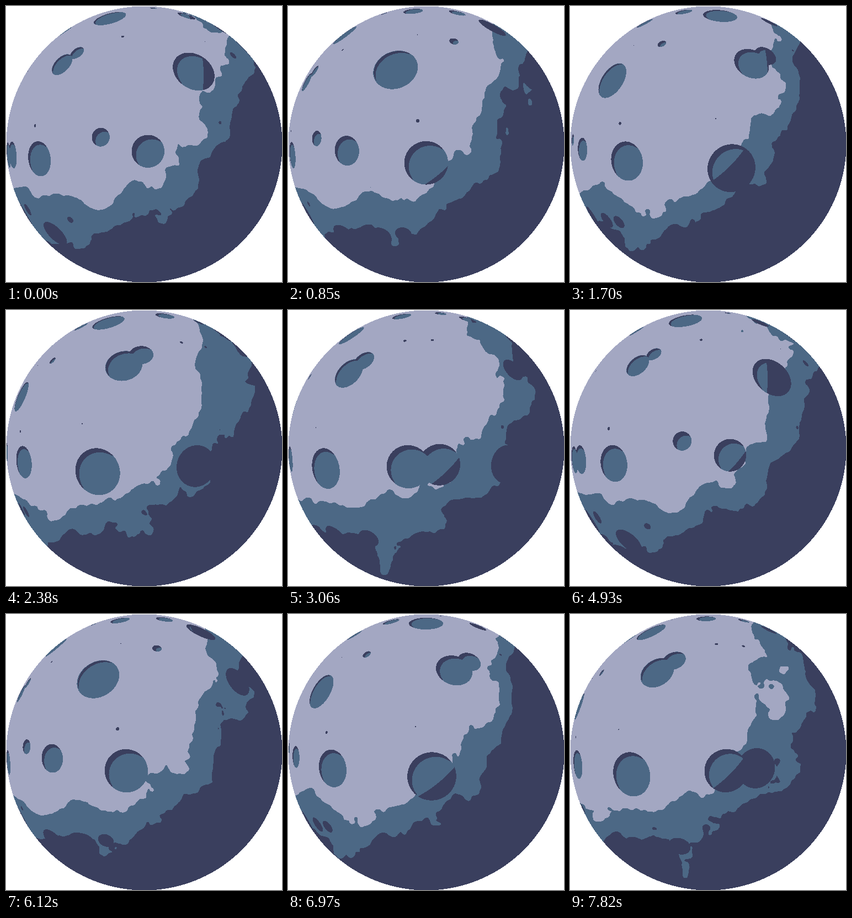
An HTML page with a canvas for the animation above (7990 ms loop, 500 by 500 pixels).

```html
<!DOCTYPE html>
<html lang="en">
<head>
<meta charset="utf-8">
<title>Rotating moon</title>
<style>
  html, body { margin: 0; height: 100%; overflow: hidden; background: #fff; }
  canvas { display: block; width: 100vw; height: 100vh; }
</style>
</head>
<body>
<canvas id="moon" width="500" height="500"></canvas>
<script>
const SIZE = 500;
const STEP_MS = 170;
const LOOP_MS = 7990;
const TURN_STEPS = 30;          // steps until the surface repeats

const GROUND_CELLS = 8;
const CRATER_CELLS = 5;
const LIGHT = 0.25;             // light position, same in x and y
const LIT_LIMIT = 0.617;
const SHADE_LIMIT = 0.731;
const CRATER_LIMIT = 0.465;
const RIM_SHIFT = (LIGHT - 0.5) * 0.03;

// Colours as ABGR
const LIT = 0xffc2a7a3;
const SHADE = 0xff85684c;
const DARK = 0xff5e3f3a;

const fract = v => v - Math.floor(v);
const smooth = t => t * t * (3 - 2 * t);

function randomGrid(cells) {
  const grid = new Float64Array(cells * cells);
  for (let y = 0; y < cells; y++) {
    for (let x = 0; x < cells; x++) {
      grid[y * cells + x] = fract(Math.sin(x * 12.9898 + y * 78.233) * 15.5453 * 0.55);
    }
  }
  return grid;
}

const groundGrid = randomGrid(GROUND_CELLS);
const craterGrid = randomGrid(CRATER_CELLS);

function noise(x, y) {
  const col = Math.floor(x), row = Math.floor(y);
  const fx = smooth(x - col), fy = smooth(y - row);
  const left = col % GROUND_CELLS, right = (col + 1) % GROUND_CELLS;
  const top = row % GROUND_CELLS * GROUND_CELLS;
  const bottom = (row + 1) % GROUND_CELLS * GROUND_CELLS;
  const a = groundGrid[top + left], b = groundGrid[top + right];
  const c = groundGrid[bottom + left], d = groundGrid[bottom + right];
  const upper = a + (b - a) * fx;
  const lower = c + (d - c) * fx;
  return upper + (lower - upper) * fy;
}

function fractalNoise(x, y) {
  let sum = 0;
  for (let scale = 0.5; scale > 0.05; scale /= 2) {
    sum += noise(x, y) * scale;
    x *= 2;
    y *= 2;
  }
  return sum;
}

// 0 inside the one crater of a grid cell, 1 outside
function outsideDisc(x, y) {
  const row = Math.floor(y);
  x += row * 0.31;
  const col = Math.floor(x);
  const h = craterGrid[row % CRATER_CELLS * CRATER_CELLS + col % CRATER_CELLS];
  const radius = h * 0.25;
  if (radius === 0) return 1;
  const centre = 0.25 + h * 0.5;
  const distance = Math.hypot(x - col - centre, y - row - centre);
  const t = (distance - radius * 0.9) / (radius * 0.1);
  return smooth(Math.min(1, Math.max(0, t)));
}

function craterDepth(u, v, shift) {
  const x = u * CRATER_CELLS + shift + 11;
  const y = v * CRATER_CELLS + 11;
  return 1 - outsideDisc(x, y) * outsideDisc(x + 1, y + 1);
}

// Everything about a pixel that does not change with the rotation
const pixels = [];
for (let py = 0; py < SIZE; py++) {
  for (let px = 0; px < SIZE; px++) {
    const x = px / SIZE, y = py / SIZE;
    const cx = x * 2 - 1, cy = y * 2 - 1;
    const square = cx * cx + cy * cy;
    if (Math.sqrt(square) > 0.99998) continue;
    const bulge = 1 + Math.sqrt(1 - square);
    const warp = fractalNoise(x, y);
    pixels.push({
      index: py * SIZE + px,
      light: Math.hypot(x - LIGHT, y - LIGHT),
      groundX: x * GROUND_CELLS + warp,
      groundY: y * GROUND_CELLS + warp,
      u: cx / bulge * 0.5 + 0.5,
      v: cy / bulge * 0.5 + 0.5
    });
  }
}

function groundColour(p, shift) {
  if (p.light < 0.33) return LIT;
  if (p.light > SHADE_LIMIT) return DARK;
  const level = p.light + fractalNoise(p.groundX + shift, p.groundY) * 0.3;
  return level > SHADE_LIMIT ? DARK : level > LIT_LIMIT ? SHADE : LIT;
}

function colourAt(p, turn) {
  const shift = turn * CRATER_CELLS;
  const depth = craterDepth(p.u, p.v, shift);
  if (depth < 0.5) return groundColour(p, turn * GROUND_CELLS);
  if (p.light > CRATER_LIMIT) return DARK;
  const inner = craterDepth(p.u + RIM_SHIFT, p.v + RIM_SHIFT, shift);
  return inner < depth - (0.5 - p.light) * 2 ? DARK : SHADE;
}

const context = document.getElementById("moon").getContext("2d");
const images = [];

function render(step) {
  const image = context.createImageData(SIZE, SIZE);
  const data = new Uint32Array(image.data.buffer);
  for (const p of pixels) data[p.index] = colourAt(p, step / TURN_STEPS);
  return image;
}

const start = performance.now();
let shown = -1;

function draw() {
  const elapsed = (performance.now() - start) % LOOP_MS;
  const step = Math.floor(elapsed / STEP_MS) % TURN_STEPS;
  if (step !== shown) {
    images[step] = images[step] || render(step);
    context.putImageData(images[step], 0, 0);
    shown = step;
  }
  requestAnimationFrame(draw);
}

draw();
</script>
</body>
</html>
```
